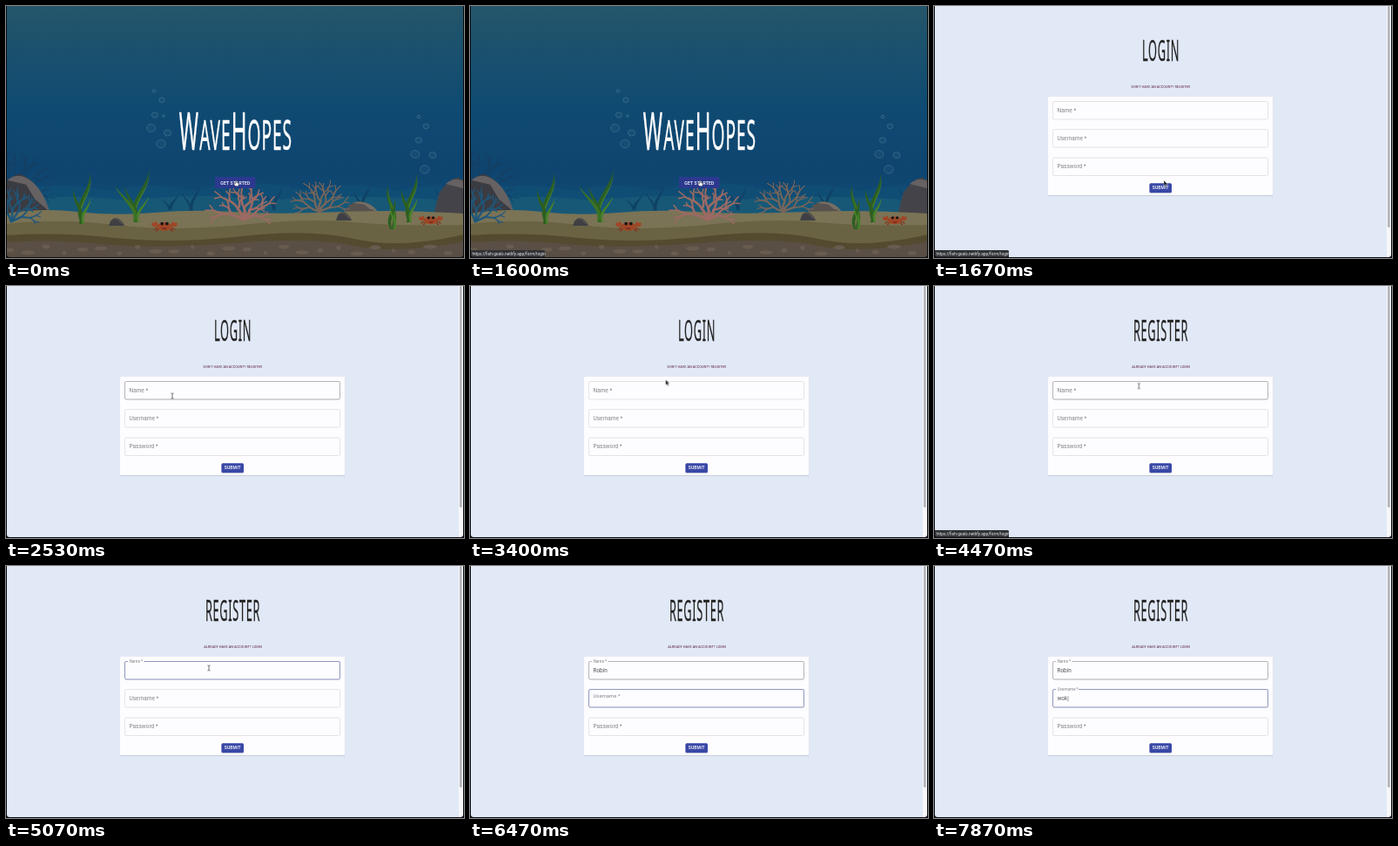
These frames come from a looping animation (526 by 289 pixels, 8000 ms). An HTML page:

```html
<!DOCTYPE html>
<html lang="en">
<head>
<meta charset="utf-8">
<title>WaveHopes</title>
<style>
html, body { margin: 0; width: 100%; height: 100%; overflow: hidden; background: #e1e8f6; }
svg { display: block; width: 100%; height: 100%; font-family: Roboto, sans-serif; }
.hand { font-family: "Noto Sans", "Open Sans", sans-serif; text-anchor: middle; stroke-linejoin: round; letter-spacing: .05em; }
.hand, .hand tspan { vector-effect: non-scaling-stroke; }
.heading { font-size: 32px; font-weight: 300; fill: #222; stroke: #222; stroke-width: .2px; }
.brand { font-size: 48px; fill: #fff; stroke: #fff; stroke-width: .4px; }
.brand tspan { font-size: 60px; }
.link { font-size: 3.92px; text-anchor: middle; fill: #5d2149; }
.button { font-weight: 500; text-anchor: middle; fill: #fff; letter-spacing: .027em; }
.label { font-size: 6.5px; fill: #85858a; }
.value { font-size: 6.4px; fill: #55555a; }
.box { fill: none; stroke: #cfcfd2; stroke-width: .55; }
.hover { stroke: #96969b; stroke-width: .6; }
.focus { stroke: #6b76ae; stroke-width: .7; }
.status { font-size: 4.8px; fill: #eceded; }
</style>
</head>
<body>
<svg viewBox="0 0 526 289" preserveAspectRatio="none">
  <defs>
    <linearGradient id="water" x2="0" y2="1">
      <stop offset="0" stop-color="#25566a"/>
      <stop offset=".2" stop-color="#19506e"/>
      <stop offset=".4" stop-color="#0f4a72"/>
      <stop offset=".65" stop-color="#0e4570"/>
      <stop offset=".8" stop-color="#0f4a73"/>
    </linearGradient>
  </defs>
  <g id="form">
    <rect width="526" height="289" fill="#e1e8f6"/>
    <rect x="520" width="5" height="289" fill="#f7f7f9"/>
    <rect x="521" width="2.6" height="254" rx="1.3" fill="#b2b3b7"/>
    <rect x="131" y="104.6" width="258.4" height="113.2" rx="1.5" fill="#bcc1cc"/>
    <rect x="131" y="104" width="258.4" height="113" rx="1.5" fill="#fdfcff"/>
    <g id="fields"></g>
    <rect x="247.5" y="204" width="25.5" height="10.8" rx="1.5" fill="#a9aec9"/>
    <rect x="247.5" y="203.3" width="25.5" height="10.6" rx="1.5" fill="#3947a6"/>
    <text class="button" x="260.3" y="210.4" font-size="5">SUBMIT</text>
    <g id="login">
      <text class="hand heading" transform="translate(260.5 63) scale(.4 1)">LOGIN</text>
      <text class="link" x="260.3" y="94">DON'T HAVE AN ACCOUNT? REGISTER</text>
    </g>
    <g id="register">
      <text class="hand heading" transform="translate(260.5 63) scale(.4 1)">REGISTER</text>
      <text class="link" x="260.5" y="94">ALREADY HAVE AN ACCOUNT? LOGIN</text>
    </g>
  </g>
  <g id="home">
    <rect width="526" height="289" fill="url(#water)"/>
    <g id="reef"></g>
    <text class="hand brand" transform="translate(264 165) scale(.4 1)"><tspan>W</tspan>AVE<tspan>H</tspan>OPES</text>
    <rect x="240" y="196" width="46.5" height="13" rx="1.5" fill="#2c398f"/>
    <text class="button" x="263.4" y="204.6" font-size="5.2">GET STARTED</text>
  </g>
  <g id="status">
    <g id="urlLogin">
      <path d="M0 280H84.5q1.5 0 1.5 1.5V288H0Z" fill="#303236"/>
      <text class="status" x="2.5" y="285.5">https://fish-goals.netlify.app/form/login</text>
    </g>
    <g id="urlRegister">
      <path d="M0 280H92.5q1.5 0 1.5 1.5V288H0Z" fill="#303236"/>
      <text class="status" x="2.5" y="285.5">https://fish-goals.netlify.app/form/register</text>
    </g>
  </g>
  <path d="M0 0H1V285Q1 288 4 288H522Q525 288 525 285V0H526V289H0Z" fill="#0b0d10"/>
  <g id="pointer"><g id="cursor">
    <path id="arrow" d="M0 0V6.2L1.5 4.9L2.5 7.2L3.5 6.8L2.5 4.6H4.4Z" fill="#111" stroke="#fff" stroke-width=".4"/>
    <path id="finger" d="M-.7 .5Q0 -.4 .7 .5V2.6L3 3.2Q3.6 3.5 3.4 4.4L2.8 6.6H-.7L-2.6 3.8Q-2 3 -.7 4.2Z" fill="#fff" stroke="#222" stroke-width=".45"/>
    <path id="beam" d="M-1.5 -3H-.5L0 -2.5L.5 -3H1.5M0 -2.5V2.5M-1.5 3H-.5L0 2.5L.5 3H1.5" fill="none" stroke="#333" stroke-width=".7"/>
  </g></g>
</svg>
<script>
const LOOP = 8000;
const byId = id => document.getElementById(id);
let css = '';

// Keyframes for one element, with times in milliseconds.
function track(id, frames, easing = 'step-end') {
  const steps = frames.map(([ms, rule]) => `${ms / LOOP * 100}%{${rule}}`).join('');
  css += `@keyframes ${id}{${steps}}#${id}{animation:${id} ${LOOP}ms ${easing} infinite}`;
}
function show(id, ...spans) {
  const frames = [[0, 'opacity:0']];
  for (const [from, to] of spans) frames.push([from, 'opacity:1'], [to, 'opacity:0']);
  track(id, frames);
}

// Underwater scene
const shape = (d, fill) => `<path d="${d}" fill="${fill}"/>`;
const bubble = (x, y, r) => `<ellipse cx="${x}" cy="${y}" rx="${r}" ry="${r * .88}" fill="#3d7590" fill-opacity=".15" stroke="#55849a" stroke-opacity=".6" stroke-width=".8"/>`;

function branch(x, y, angle, length, depth, width) {
  const bend = Math.sin(x * 1.7 + y * 2.3);
  const endX = x + Math.cos(angle) * length, endY = y + Math.sin(angle) * length;
  const midX = (x + endX) / 2 + bend * length * .2, midY = (y + endY) / 2;
  const line = `<path d="M${x} ${y}Q${midX} ${midY} ${endX} ${endY}" stroke-width="${width}"/>`;
  if (!depth) return line;
  const next = (turn, scale) => branch(endX, endY, angle + turn, length * scale, depth - 1, width * .78);
  return line + next(-.5 + bend * .15, .8 + bend * .12) + next(.45 + bend * .2, .74 - bend * .12);
}
function coral(x, y, size, color, width, stems = [-2.7, -2, -1.45, -.95, -.4]) {
  const lines = stems.map(angle => branch(x, y, angle, size, 3, width)).join('');
  return `<g fill="none" stroke="${color}" stroke-linecap="round">${lines}</g>`;
}

// A tapering blade that sways along its height.
function blade(x, y, height, lean, color, width = 4) {
  const left = [], right = [];
  for (let t = 0; t <= 1.001; t += .1) {
    const middle = x + lean * t * t + Math.sin(t * 6) * Math.sign(lean) * -height * .05;
    const half = width * (.45 + .55 * Math.sin(t * 3)) * (1 - t ** 3) / 2;
    const top = y - height * t;
    left.push(`${middle - half} ${top}`);
    right.unshift(`${middle + half} ${top}`);
  }
  return shape('M' + left.concat(right).join('L') + 'Z', color);
}
const weed = (x, y, h, lean, color, light) =>
  blade(x, y, h, lean, color, 5) + blade(x + 1, y, h * .92, lean, light, 1.6) +
  blade(x - 2, y, h * .68, -lean * .8, color, 4.5) + blade(x + 2, y, h * .5, lean * .9, light, 3.5);
const rock = (x, y, w, h, color, light) =>
  shape(`M${x} ${y}L${x + w * .12} ${y - h * .62}Q${x + w * .3} ${y - h} ${x + w * .48} ${y - h}Q${x + w * .8} ${y - h * .85} ${x + w} ${y}Z`, color) +
  shape(`M${x + w * .24} ${y - h * .85}Q${x + w * .45} ${y - h * 1.1} ${x + w * .7} ${y - h * .8}Q${x + w * .9} ${y - h * .55} ${x + w} ${y - h * .05}L${x + w * .74} ${y - h * .36}L${x + w * .58} ${y - h * .74}Z`, light);
const crab = (x, y, s) => `<g transform="translate(${x} ${y}) scale(${s})">
  <path d="M-8 2L-13 5M-7 4L-10 7M8 2L13 5M7 4L10 7M-8 0L-12 -2M8 0L12 -2" stroke="#84351c" stroke-width="1.5"/>
  <path d="M-15 -4A3.5 3.5 0 1 0 -10 -5L-13 -3.5ZM15 -4A3.5 3.5 0 1 1 10 -5L13 -3.5Z" fill="#a04626"/>
  <ellipse rx="8.8" ry="5" cy="1" fill="#a04626"/>
  <circle cx="-3" cy="-2.5" r="1.9" fill="#191516"/><circle cx="3" cy="-2.5" r="1.9" fill="#191516"/>
  <path d="M-2.5 3Q0 4.5 2.5 3" fill="none" stroke="#5c1d10"/></g>`;

const farWeeds = [[214, 236, 30], [190, 234, 18], [309, 234, 26], [410, 235, 32], [505, 236, 38]];
const pebbles = Array.from({ length: 26 }, (_, i) =>
  `<ellipse cx="${i * 21 + 4}" cy="${280 + 4 * Math.sin(i * 2.4)}" rx="${5 + 3 * Math.sin(i * 1.7)}" ry="2.4" fill="#675c4f"/>`).join('');

byId('reef').innerHTML = [
  [170, 97.5, 2], [179, 108, 3.2], [171, 125, 3.6], [181, 126, 1.5], [166.5, 140, 5], [185.5, 145.5, 4], [178, 158, 5.3],
  [474, 127, 2], [482.5, 138, 3.2], [474, 154, 3.6], [470, 170, 5], [490, 171, 4], [481, 187.5, 5.3]
].map(b => bubble(...b)).join('') +
  shape('M0 212Q60 200 120 212Q165 200 215 212Q280 196 340 210Q400 200 450 212Q490 202 526 210V250H0Z', '#104d75') +
  shape('M0 224Q70 214 140 223Q230 213 300 223Q390 214 526 224V250H0Z', '#175877') +
  farWeeds.map(([x, y, h]) => blade(x, y, h, 8, '#0f4265') + blade(x - 3, y, h * .75, -9, '#0f4265', 3)).join('') +
  coral(8, 214, 17, '#173f61', 1.8, [-1.9, -1.3, -.8, -.2]) +
  rock(-14, 238, 64, 45, '#3b3b42', '#666162') +
  rock(490, 244, 62, 47, '#45434a', '#666162') +
  rock(389, 237, 38, 13, '#57524f', '#746e66') +
  coral(360, 236, 12, '#79655a', 2.4) +
  shape('M0 238Q40 231 82 236T170 237T260 236T355 237T440 235T526 238V289H0Z', '#7a7355') +
  shape('M0 250Q60 243 126 251T270 251T400 248T526 251V289H0Z', '#6a6343') +
  shape('M0 263Q60 259 126 266T270 264T400 267T526 262V289H0Z', '#544a2f') +
  shape('M0 271Q50 267 110 273T260 272T400 275T526 270V289H0Z', '#594f45') +
  pebbles +
  coral(6, 247, 13, '#1f587c', 2.5, [-2, -1.45, -.95, -.4]) +
  coral(272, 245, 13.5, '#9b6a64', 3.3) +
  rock(118, 252, 18, 9, '#3f3f44', '#55524e') +
  rock(379, 246, 18, 10, '#3f3f44', '#55524e') +
  weed(87, 250, 59, 9, '#2c5f20', '#47802a') +
  weed(150, 248, 61, 14, '#2c5f20', '#47802a') + blade(147, 248, 42, -22, '#3b7225', 5) +
  weed(444, 256, 51, -5, '#2c5f20', '#47802a') + weed(463, 248, 56, 8, '#2c5f20', '#47802a') +
  crab(182, 252, .95) + crab(488, 245, .88);

// Form fields
const labelX = 141.5;
const boxAt = (y, kind, id) => `<rect ${id ? `id="${id}"` : ''} class="box ${kind}" x="136.5" y="${y}" width="247" height="20.5" rx="1.6"/>`;

function field(key, y, text, notchWidth) {
  return boxAt(y, '') + boxAt(y, 'hover', key + 'Hover') + boxAt(y, 'focus', key + 'Focus') +
    `<rect id="${key}Notch" x="140" y="${y - 1}" width="${notchWidth}" height="2" fill="#fdfcff"/>` +
    `<g id="${key}Label"><text class="label">${text} *</text></g>`;
}
function floatLabel(key, y, start) {
  const rest = `transform:translate(${labelX}px,${y + 12.4}px)`;
  const raised = `transform:translate(${labelX}px,${y + 1.6}px) scale(.72)`;
  const frames = start < LOOP
    ? [[0, rest], [start, rest], [start + 160, raised], [LOOP, raised]]
    : [[0, rest], [LOOP, rest]];
  track(key + 'Label', frames, 'ease-out');
  show(key + 'Notch', [start + 40, LOOP]);
}
// Each state is the text so far, from its time until the next one.
function typed(key, y, states) {
  return states.map(([from, text, caret], i) => {
    const id = key + 'Text' + i;
    show(id, [from, states[i + 1]?.[0] ?? LOOP]);
    return `<text id="${id}" class="value" x="${labelX}" y="${y + 12.4}">${text}${caret ? '|' : ''}</text>`;
  }).join('');
}

byId('fields').innerHTML =
  field('name', 109.5, 'Name', 18.5) + field('user', 141.5, 'Username', 26) + field('pass', 174, 'Password', 26) +
  typed('name', 109.5, [[4730, '', 1], [5070, '', 0], [5470, 'R', 1], [5730, 'Ro', 1], [5930, 'Rob', 1],
    [6030, 'Robi', 1], [6130, 'Robin', 1], [6470, 'Robin', 0]]) +
  typed('user', 141.5, [[6600, '', 1], [7000, '', 0], [7470, 'w', 1], [7730, 'wo', 1], [7870, 'wok', 1]]);

floatLabel('name', 109.5, 4560);
floatLabel('user', 141.5, 6440);
floatLabel('pass', 174, LOOP);
show('nameHover', [2435, 3370], [4370, 4600], [6470, LOOP]);
show('userHover', [2235, 2340]);
show('passHover', [2045, 2175]);
show('nameFocus', [4600, 6470]);
show('userFocus', [6470, LOOP]);
show('passFocus');

// Pages, status line and pointer
show('home', [0, 1670]);
show('form', [1670, LOOP]);
show('login', [1670, 3870]);
show('register', [3870, LOOP]);
show('urlLogin', [0, 3000], [3870, LOOP]);
show('urlRegister', [3000, 3870]);
track('status', [[0, 0], [1000, 0], [1200, 1], [1930, 1], [2130, 0], [3620, 0], [3760, 1], [4930, 1], [5070, 0], [LOOP, 0]]
  .map(([ms, alpha]) => [ms, `opacity:${alpha}`]), 'linear');
track('cursor', [[0, 264, 200], [1930, 264, 200], [2530, 191, 126], [2600, 191, 122.5], [3000, 191, 122.5],
  [3800, 258, 92.5], [4000, 258, 92.5], [4600, 233, 117], [LOOP, 233, 117]]
  .map(([ms, x, y]) => [ms, `transform:translate(${x}px,${y}px)`]), 'ease-in-out');
show('pointer', [0, 5470]);
show('finger', [0, 1670], [3620, 4150]);
show('arrow', [1670, 2045], [2175, 2235], [2340, 2435], [3370, 3620], [4150, 4370]);
show('beam', [2045, 2175], [2235, 2340], [2435, 3370], [4370, LOOP]);

document.head.appendChild(document.createElement('style')).textContent = css;
</script>
</body>
</html>
```
